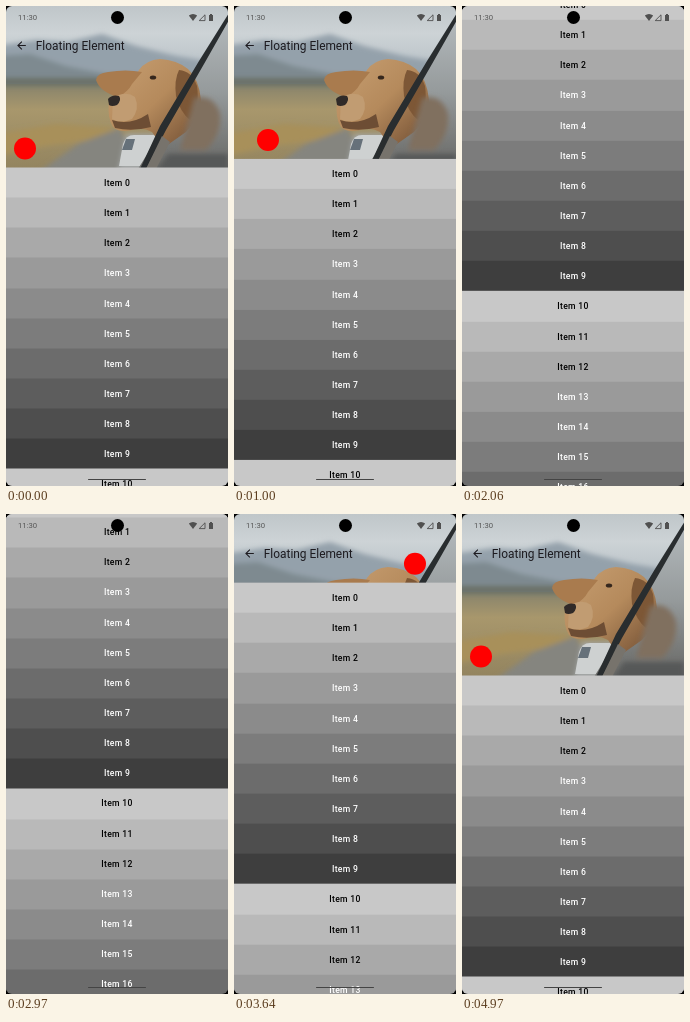
Animation of 222x480 px, one loop 5030 ms. Source, as an HTML page:

```html
<!DOCTYPE html>
<html lang="en">
<head>
<meta charset="utf-8">
<title>Floating Element</title>
<style>
/* --h: top edge of the list in px, --s: overscroll stretch */
@property --h { syntax: '<number>'; inherits: true; initial-value: 161.5; }
@property --s { syntax: '<number>'; inherits: true; initial-value: 0; }

html, body { margin: 0; width: 100%; height: 100%; overflow: hidden; background: #000; }
#screen {
  position: relative; width: 222px; height: 480px; overflow: hidden;
  border-radius: 6px; font-family: Roboto, sans-serif;
  animation: scroll 5030ms infinite, stretch 5030ms infinite linear;
}
#screen > * { position: absolute; }
#photo { left: 0; top: 0; }

#bar {
  left: 0; top: 24px; width: 222px; height: 30px; color: #1d1b20;
  transform: translateY(calc(min(0, var(--h) - 54) * 1px));
}
#bar svg { position: absolute; left: 8.5px; top: 9px; }
#bar span {
  position: absolute; left: 29.8px; top: 1px; line-height: 30.6px;
  font-size: 11.9px; white-space: nowrap;
}
#dot {
  left: 8px; top: -30.5px; width: 22px; height: 22px; border-radius: 50%; background: #f00;
  transform: translate(min(184px, calc((161.5 - var(--h)) * 1.745px)), calc(var(--h) * 1px));
}
#list {
  left: 0; top: 0; width: 222px; transform-origin: 0 0;
  transform: translateY(calc(var(--h) * 1px)) scaleY(calc(1 + var(--s)));
}
.row {
  height: 30.15px; line-height: 30.4px; text-align: center;
  font-size: 8.64px; font-weight: 500; letter-spacing: .27px;
  box-shadow: 0 1px var(--grey); background: var(--grey);
}
#time { left: 12px; top: 6px; line-height: 11px; font-size: 7.7px; color: #555; }
#icons { left: 182px; top: 5px; }
#hole { left: 104.5px; top: 4.6px; width: 13px; height: 13px; border-radius: 50%; background: #000; }
#pill { left: 82px; top: 472.6px; width: 58px; height: 1.7px; border-radius: 1px; background: #444; }

@keyframes scroll {
  0%, 13.917% { --h: 161.5; animation-timing-function: cubic-bezier(.5, 0, .8, .4); }
  19.881% { --h: 153; animation-timing-function: cubic-bezier(.3, .18, .7, .64); }
  32.008% { --h: 67; animation-timing-function: cubic-bezier(.4, .45, .6, 1); }
  44.732%, 58.449% { --h: -26.8; animation-timing-function: cubic-bezier(.35, 0, .7, .6); }
  72.366% { --h: 68.5; animation-timing-function: cubic-bezier(.33, .37, .66, .8); }
  84.294%, 100% { --h: 161.5; }
}
@keyframes stretch {
  0%, 84.294% { --s: 0; }
  86.083% { --s: .0062; }
  87.873% { --s: .0065; }
  91.451%, 100% { --s: 0; }
}
</style>
</head>
<body>
<div id="screen">
  <svg id="photo" width="222" height="163" viewBox="0 0 222 163">
    <defs>
      <linearGradient id="sky" x2="0" y2="1">
        <stop offset="0" stop-color="#bfc6c9"/>
        <stop offset=".3" stop-color="#cdd3d6"/>
        <stop offset="1" stop-color="#a9b4bc"/>
      </linearGradient>
      <linearGradient id="field" x2="0" y2="1">
        <stop offset="0" stop-color="#87836c"/>
        <stop offset=".3" stop-color="#a8976c"/>
        <stop offset="1" stop-color="#93845f"/>
      </linearGradient>
      <linearGradient id="fur" x2="1" y2="1">
        <stop offset="0" stop-color="#c79f72"/>
        <stop offset=".5" stop-color="#b58a5c"/>
        <stop offset="1" stop-color="#6f4c31"/>
      </linearGradient>
      <linearGradient id="pane" x2="0" y2="1">
        <stop offset="0" stop-color="#b4babd"/>
        <stop offset=".5" stop-color="#959a9b"/>
        <stop offset="1" stop-color="#686865"/>
      </linearGradient>
      <filter id="far" x="-10%" y="-30%" width="120%" height="160%"><feGaussianBlur stdDeviation="2.5"/></filter>
      <filter id="near"><feGaussianBlur stdDeviation=".7"/></filter>
    </defs>
    <rect width="222" height="90" fill="url(#sky)"/>
    <g filter="url(#far)">
      <path d="M-8 40 30 34 62 36 96 28 130 40 170 50 230 60V90H-8Z" fill="#94a1ab"/>
      <path d="M-8 50 24 48 60 60 100 68 230 70V92H-8Z" fill="#7e8a90"/>
    </g>
    <rect y="78" width="222" height="85" fill="url(#field)"/>
    <g filter="url(#far)">
      <path d="M-8 72H112V80H-8Z" fill="#6b7168"/>
      <path d="M-8 128 50 118 112 122V130L40 140-8 150Z" fill="#a8905a"/>
      <path d="M30 168 72 138 114 122 134 168Z" fill="#85857f"/>
      <path d="M112 166 120 128H160V166Z" fill="#a2a5a4"/>
    </g>
    <g filter="url(#near)">
      <path d="M113 160 117 138Q120 129 128 129H150L142 160Z" fill="#ced1d1"/>
      <path d="M116 144 120 133H129L126 144Z" fill="#66717a"/>
      <path d="M222 10V163H132L156 124Z" fill="url(#pane)"/>
      <path d="M133 64Q140 54 154 53 171 54 182 63 193 73 195 94 195 110 180 126L160 140Q151 134 146 126 136 120 126 124 113 127 107 121 101 112 103 95 107 87 121 82 127 74 133 64Z" fill="url(#fur)"/>
      <path d="M136 66Q120 63 102 66 91 67 90 74 94 86 112 91 122 86 126 78Z" fill="#a97b4e"/>
      <path d="M173 64Q186 65 191 80 194 100 184 114 174 106 170 90 168 74 173 64Z" fill="#7d5736"/>
      <path d="M107 92Q120 84 129 91 134 103 126 113 114 118 106 113Z" fill="#c19c72"/>
      <path d="M106 114Q124 120 142 108L145 121Q126 126 109 122Z" fill="#6d4d34"/>
      <path d="M102 93Q106 88 113 90 116 94 111 99 106 101 103 99Z" fill="#302a28"/>
      <ellipse cx="147" cy="71.5" rx="3.2" ry="2" fill="#35271d"/>
    </g>
    <g filter="url(#far)">
      <path d="M188 92Q208 88 214 108 216 128 200 144H174Z" fill="#80705f"/>
      <path d="M162 148H222V166H150Z" fill="#575958"/>
    </g>
    <g filter="url(#near)">
      <path d="M223 7 193 55 154 120 134 163H140L160 124 198 58 223 14Z" fill="#292d2f"/>
      <path d="M156 130 140 163H150L164 136Z" fill="#77736c"/>
    </g>
  </svg>
  <div id="dot"></div>
  <div id="bar">
    <svg width="13" height="13" viewBox="0 0 24 24"><path fill="currentColor" d="M20 11H7.83l5.59-5.59L12 4l-8 8 8 8 1.41-1.41L7.83 13H20z"/></svg>
    <span>Floating Element</span>
  </div>
  <div id="list"></div>
  <div id="time">11:30</div>
  <svg id="icons" width="30" height="13" fill="#505050">
    <path d="M.8 4.6Q5 1.2 9.2 4.6L5 10Z"/>
    <path d="M17 3.8V9.6H11.2Z" fill="none" stroke="#505050" stroke-width=".9"/>
    <path d="M21 4H22V3H24V4H25V10H21Z"/>
  </svg>
  <div id="hole"></div>
  <div id="pill"></div>
</div>
<script>
const list = document.getElementById('list');
for (let i = 0; i < 18; i++) {
  const row = document.createElement('div');
  const k = i % 10;
  const grey = Math.round(200 - k * 15.3);
  row.className = 'row';
  row.textContent = 'Item ' + i;
  row.style.setProperty('--grey', `rgb(${grey}, ${grey}, ${grey})`);
  row.style.color = k < 3 ? '#000' : '#fff';
  list.append(row);
}
</script>
</body>
</html>
```
